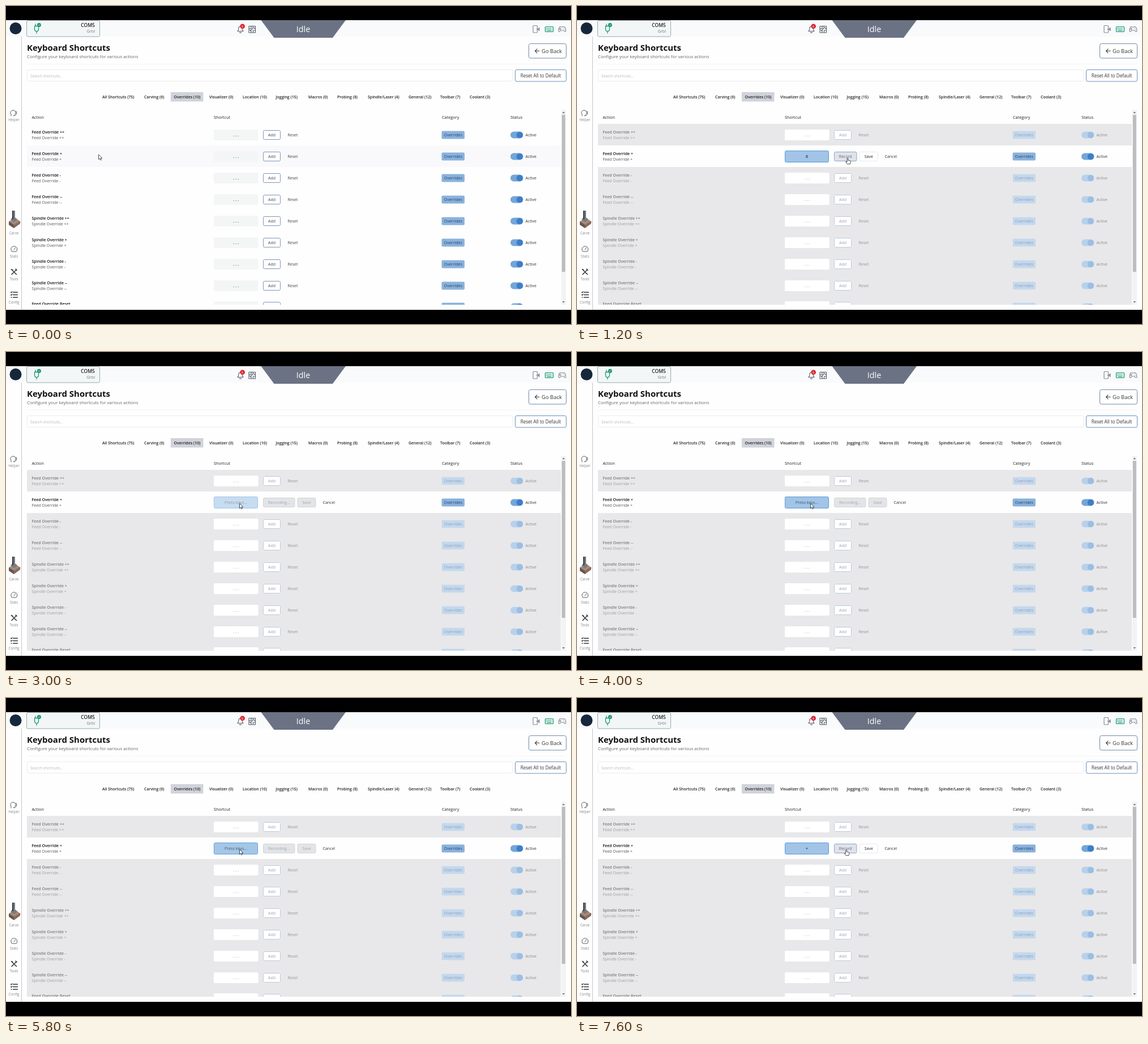
Animation, 998 px wide and 561 px high, one loop 8 s. Source, as an HTML page:

```html
<!DOCTYPE html>
<html lang="en">
<head>
<meta charset="utf-8">
<title>Keyboard Shortcuts</title>
<style>
  html, body { margin: 0; width: 100%; height: 100%; overflow: hidden; background: #000; }
  svg { display: block; width: 998px; height: 561px; font-family: "Open Sans", "Noto Sans", sans-serif; }
  .line { fill: none; stroke-linecap: round; stroke-linejoin: round; }
</style>
</head>
<body>
<svg viewBox="0 0 998 561">
  <defs>
    <clipPath id="table"><rect x="37" y="184" width="944" height="343"/></clipPath>
  </defs>
  <rect y="25" width="998" height="511" fill="#fefefe"/>
  <rect y="25" width="998" height="29" fill="#f9fafb"/>
  <path d="M27.5 54V536" stroke="#c4c6ca"/>
  <path d="M37 102.5H989" stroke="#f4f4f5"/>
  <circle cx="17" cy="39.5" r="10.5" fill="#17273b"/>

  <rect x="36.5" y="25.5" width="129" height="28.500" rx="2.5" fill="#f3f6f7" stroke="#93abab"/>
  <g class="line" stroke="#17976f" stroke-width="1.3">
    <path d="M50.500 35.500V41q0 3 3.500 4 3.500-1 3.500-4V35.500ZM52 35v-3M56 35v-3M54 45v3"/>
    <circle cx="58.500" cy="33.500" r="2.800" fill="#17976f"/>
    <path d="m57 33.500 1 1 2-2" stroke="#fff" stroke-width=".8"/>
  </g>
  <path d="M450.500 25H600L577 56H473.500Z" fill="#6b7283"/>

  <g class="line" stroke="#555b66" stroke-width="1.1">
    <path d="M409 44.500q2-2 2-5.500 0-3 3-3t3 3q0 3.500 2 5.500ZM412.500 46.500q1.500 1.500 3 0"/>
    <path d="M429 35.500h11.500v11.500h-11.500ZM433 35.500v4h-4M433 47v-5l3-3v-3.500M436.500 47v-4h4M430.500 42l2 2M437.500 38l2 2"/>
  </g>
  <circle cx="417.700" cy="35.700" r="4.300" fill="#dc2432"/>
  <g class="line" stroke="#858b96" stroke-width="1.2">
    <rect x="931" y="34.500" width="7.500" height="12.500" rx="1"/>
    <path d="M937 41h4M942 38.500v5l-2.500-2.500Z"/>
    <path d="M978.500 36.500q3.500 1 7.500 0 2.500 1 3 7.500-1.500 3-4-1h-5q-2.500 4-4 1 .5-6.500 2.500-7.500ZM979 39v3M977.500 40.500h3M985 39.500v.1M986.500 41.500v.1"/>
  </g>
  <g class="line" stroke="#17976f" stroke-width="1.2">
    <rect x="952.500" y="36.500" width="14" height="9" rx="1" fill="#e3f3ed"/>
    <path d="M955 39h9M955 41.200h9" stroke-dasharray=".4 2"/>
    <path d="M956 43.500h7"/>
  </g>

  <g class="line" stroke="#555b66" stroke-width="1">
    <path d="M9 194v-2.500q-2-2.500-.5-5.500 2-3 5.500-2 3.500 1 3.200 5l-1.200 2v2.500h-3M18 185.500q2 3 0 6"/>
    <path d="M10 432.800a5.500 5.500 0 1 1 8.500 0ZM14 430l2.500-3.500"/>
    <path d="m10 465 8.500 8.500M18.500 465l-8.500 8.500M9.500 464.500l2 1M17 464l2 2" stroke="#30343b" stroke-width="1.6"/>
    <path d="M12.500 505h8M12.500 509.500h8M12.500 514h8M8.500 505l.8.8 1.500-1.800M8.500 509.500l.8.8 1.500-1.800M9 514h1" stroke="#30343b" stroke-width="1.300"/>
  </g>
  <path d="M5 380 17 374 26 381 14 391Z" fill="#a58a7b"/>
  <path d="M5 380 14 386V392L5 386Z" fill="#67564e"/>
  <path d="M14 386 25 379V384L14 392Z" fill="#8b6b5c"/>
  <path d="M11 361h5v12l4 4-6 4-6-4 3-4Z" fill="#777b80"/>
  <path d="M11 361h2v15h-2Z" fill="#34373a"/>

  <rect x="923.500" y="66.500" width="66" height="25.500" rx="3" fill="#fff" stroke="#7189a8"/>
  <path class="line" d="M942 79.300h-7.500m3.500-3.500-3.500 3.500 3.500 3.500" stroke="#333" stroke-width="1.100"/>
  <rect x="37.500" y="112.500" width="857" height="20" rx="2" fill="#fff" stroke="#ececee"/>
  <rect x="899.500" y="112.500" width="90" height="20.500" rx="2.500" fill="#fff" stroke="#6b8fb9"/>
  <rect x="291" y="152" width="57.500" height="16.500" fill="#d0d3da"/>

  <rect x="981" y="183" width="8" height="344" fill="#f3f3f3"/>
  <rect x="981.800" y="192" width="6" height="277" fill="#bdbdbf"/>
  <path d="m982.500 189 2.300-2.500 2.300 2.500ZM982.500 521l2.300 2.500 2.300-2.500Z" fill="#666"/>

  <g id="labels"></g>
  <g id="rows" clip-path="url(#table)"></g>
  <g id="arrow"><path d="M0 0V8.700L2 6.900 3.500 10 5 9.300 3.600 6.400H6.300Z" fill="#fff" stroke="#222" stroke-width=".8"/></g>
  <g id="hand"><path d="M-.9 1q.9-1.600 1.800 0V4.200l3.600 1q1.200.5.900 2l-.8 3.600H-.6L-3.300 7q.2-1.600 2.400.2Z" fill="#fff" stroke="#222" stroke-width=".8"/></g>
</svg>
<script>
const $ = id => document.getElementById(id);
const LOOP = 8000, STEP = 200, PITCH = 37.93;
const EDIT = 1200, RECORD = 2000, PRESSED = 6400, READY = 6600;

const text = (x, y, s, size = 7, fill = '#333', weight = 400, anchor = 'start') =>
  `<text x="${x}" y="${y}" font-size="${size}" fill="${fill}" font-weight="${weight}" text-anchor="${anchor}">${s}</text>`;
const box = (x, y, w, h, fill, stroke = 'none', rx = 2) =>
  `<rect x="${x}" y="${y}" width="${w}" height="${h}" rx="${rx}" fill="${fill}" stroke="${stroke}"/>`;
const button = (x, w, cy, label, fill, stroke, color) =>
  box(x + .5, cy - 8, w - 1, 16, fill, stroke) + text(x + w / 2, cy + 2.5, label, 7, color, 400, 'middle');

const tabs = [[170, 'All Shortcuts (75)'], [244, 'Carving (6)'], [296.5, 'Overrides (10)'], [359, 'Visualizer (0)'],
  [418, 'Location (10)'], [476.5, 'Jogging (15)'], [534, 'Macros (0)'], [585, 'Probing (8)'], [639, 'Spindle/Laser (4)'],
  [711, 'General (12)'], [767, 'Toolbar (7)'], [819, 'Coolant (3)']];
const heads = [[45.5, 'Action'], [367, 'Shortcut'], [770, 'Category'], [891, 'Status']];
const tools = [[202.5, 'Helper'], [403, 'Carve'], [443.5, 'Stats'], [484, 'Tools'], [524.5, 'Config']];

$('labels').innerHTML =
  text(37, 79, 'Keyboard Shortcuts', 15, '#111', 700) +
  text(37, 91.5, 'Configure your keyboard shortcuts for various actions', 7.85, '#666') +
  text(157, 36.8, 'COM5', 8.6, '#222', 600, 'end') +
  text(157, 47.3, 'Grbl', 7.3, '#777', 400, 'end') +
  text(525, 46, 'Idle', 14.3, '#fff', 400, 'middle') +
  text(417.7, 37.8, '6', 5.5, '#fff', 400, 'middle') +
  text(946, 82.8, 'Go Back', 9.5, '#333') +
  text(43, 125.5, 'Search shortcuts...', 6.7, '#b8b8bc') +
  text(944.5, 125.6, 'Reset All to Default', 8.1, '#333', 400, 'middle') +
  tabs.map(([x, s]) => text(x, 162.5, s, 6.95, '#222', 600)).join('') +
  heads.map(([x, s]) => text(x, 198.7, s, 7.3, '#222', 500)).join('') +
  tools.map(([y, s]) => text(14, y, s, 6.3, '#888', 400, 'middle')).join('');

const actions = ['Feed', 'Spindle'].flatMap(s => ['++', '+', '-', '--'].map(k => `${s} Override ${k}`))
  .concat('Feed Override Reset');

const pill = (cy, fill) => box(769.5, cy - 7, 40.5, 14, fill);
const track = (cy, fill) => box(891, cy - 6, 22.5, 12, fill, 'none', 6);
const field = (cy, fill) => box(367, cy - 9.5, 78.5, 19, fill);

function plainControls(cy, editing, hover) {
  return field(cy, editing ? '#fff' : '#f4f6f6') + text(406, cy + 2.2, '. . .', 7.4, '#333', 600, 'middle') +
    button(454, 31, cy, 'Add', hover ? '#e3e6ea' : '#fff', '#7d94b8', '#444') + text(497.5, cy + 2.5, 'Reset', 7, '#444');
}

// Opacity of the waiting field: eased dip and return every two seconds.
function pulse(t) {
  const p = ((t - RECORD) % 2000) / 1000;
  const x = p < 1 ? p : 2 - p;
  return 1 - .42 * x * x * (3 - 2 * x);
}

function editControls(cy, t, pointer) {
  const recording = t >= RECORD && t < PRESSED;
  const keys = recording ? text(406, cy + 2.3, 'Press keys...', 7.2, '#456', 400, 'middle')
    : text(406, cy + 2.5, t < RECORD ? '6' : '+', 7, '#234', 600, 'middle');
  const input = `<g opacity="${recording ? pulse(t) : 1}">` +
    box(367.5, cy - 10, 77, 20, '#a1c4e7', '#5c9bda') + keys + '</g>';
  if (recording) return input +
    button(454, 56.5, cy, 'Recording...', '#e3e4e7', '#d0d3d8', '#a2a5ab') +
    button(514.5, 33, cy, 'Save', '#e3e4e7', '#d0d3d8', '#a2a5ab') + text(559.5, cy + 2.5, 'Cancel', 7, '#333');
  const settling = t >= PRESSED && t < READY;
  return input +
    button(454, 40.5, cy, 'Record', settling ? '#d1d4da' : pointer ? '#dfe3e9' : '#fff', settling ? '#b4bac4' : '#8ba6c8', settling ? '#444' : '#667') +
    button(498.5, 33.5, cy, 'Save', settling ? '#d1d4da' : '#fff', settling ? '#b4bac4' : '#e6e8ec', '#222') +
    text(543.5, cy + 2.5, 'Cancel', 7, '#333');
}

function row(name, i, t, pointer) {
  const cy = 227.5 + Math.round(i * PITCH), editing = t >= EDIT, active = i === 1, dim = editing && !active;
  const back = dim ? '#e8e8ea' : active && !editing ? '#f9f9fb' : '#fefefe';
  // Faded controls keep a white backing so the grey row does not show through.
  const backing = dim ? field(cy, '#fff') + box(454, cy - 8.5, 31, 17, '#fff') + pill(cy, '#fff') + track(cy, '#fff') : '';
  return box(37, cy - 19.5, 943, 38, back, 'none', 0) +
    box(37, cy + 18.5, 943, 1, '#e6e6e8', 'none', 0) + backing +
    `<g opacity="${dim ? .5 : 1}">` +
    text(45.5, cy - 2.7, name, 7, '#111', 600) + text(45.5, cy + 7.9, name, 7.1, '#555') +
    (active && editing ? editControls(cy, t, pointer) : plainControls(cy, editing, active && pointer)) +
    pill(cy, '#8ab2dc') + text(789.8, cy + 2.5, 'Overrides', 7.1, '#23456f', 400, 'middle') +
    track(cy, '#74a5d9') + `<circle cx="907.3" cy="${cy}" r="5.6" fill="#3c7fc7"/>` +
    text(917.5, cy + 2.5, 'Active', 7, '#333') + '</g>';
}

// Pointer keys: time, x, y of the tip.
const path = [[0, 163.5, 262], [1000, 478, 268], [2000, 478, 268], [3000, 412.5, 267],
  [5800, 412.5, 267], [6400, 411, 267], [6800, 411, 267], [7600, 475.5, 267], [LOOP, 475.5, 267]];
function pointerAt(t) {
  const i = path.findIndex(k => k[0] > t);
  const [a, b] = [path[i - 1], path[i]];
  const p = (t - a[0]) / (b[0] - a[0]), e = p * p * (3 - 2 * p);
  return [1, 2].map(n => a[n] + (b[n] - a[n]) * e);
}

let last = -1;
function frame(now) {
  const t = Math.floor(now % LOOP / STEP) * STEP;
  if (t !== last) {
    last = t;
    const [x, y] = pointerAt(t);
    const recording = t >= RECORD && t < PRESSED;
    const pointer = !recording && x > 454;
    $('rows').innerHTML = actions.map((name, i) => row(name, i, t, pointer)).join('');
    for (const id of ['arrow', 'hand']) {
      $(id).setAttribute('transform', `translate(${x} ${y})`);
      $(id).style.display = (id === 'hand') === pointer ? '' : 'none';
    }
  }
  requestAnimationFrame(frame);
}
frame(performance.now());
</script>
</body>
</html>
```
